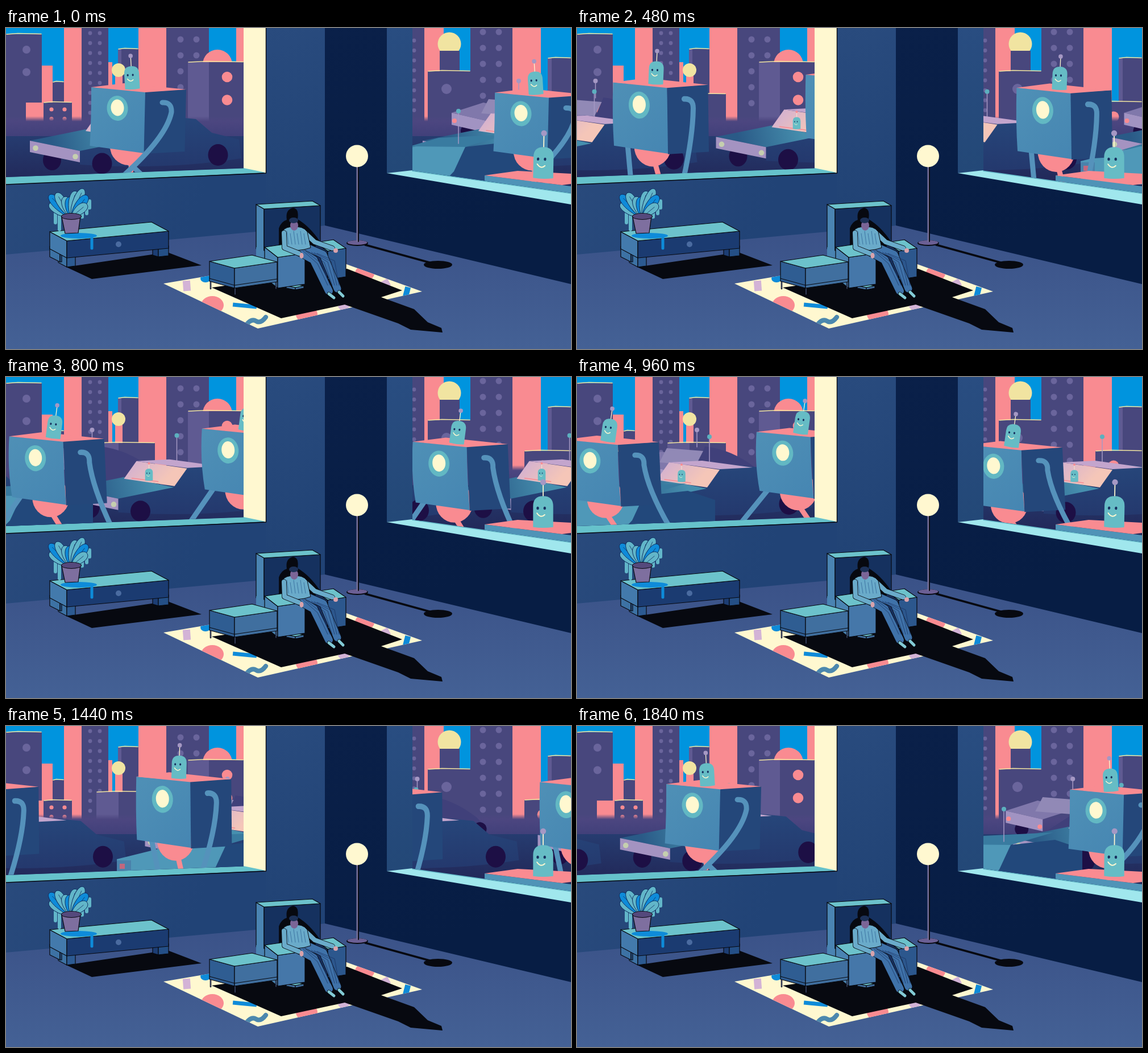
An HTML page with a canvas for the animation above (1.92 s loop, 994 by 564 pixels).

```html
<!DOCTYPE html>
<html lang="en">
<head>
<meta charset="utf-8">
<title>Evening traffic</title>
<style>
html,body{margin:0;width:100%;height:100%;overflow:hidden;background:#24467a}
canvas{display:block;width:994px;height:564px}
</style>
</head>
<body>
<canvas id="c" width="994" height="564"></canvas>
<script>
const W = 994, H = 564, FRAME = 80, COUNT = 24, STRIDE = 23.5, TAU = 2 * Math.PI;
const PINK = '#f98b91', CREAM = '#fff8d0', TEAL = '#6cc2cb', PURPLE = '#48477d', LILAC = '#6a659c',
  STEEL = '#5592bb', INK = '#070910', PLUM = '#1d0f45', YELLOW = '#f1e4a1', MAUVE = '#a598c4',
  SKIN = '#66bcc5', BLUE = '#0e8bd9', NAVY = '#17305f';
const screen = document.getElementById('c').getContext('2d');
let g = screen;

// drawing helpers
function layer(draw) {
  const c = document.createElement('canvas');
  c.width = W; c.height = H;
  g = c.getContext('2d');
  draw();
  g = screen;
  return c;
}
function trace(p) {
  g.beginPath();
  for (let i = 0; i < p.length; i += 2) g.lineTo(p[i], p[i + 1]);
}
function poly(fill, p, edge) {
  trace(p); g.closePath();
  g.fillStyle = fill; g.fill();
  if (edge) { g.strokeStyle = edge; g.lineWidth = 1.2; g.lineJoin = 'round'; g.stroke(); }
}
// parallelogram from a corner and two edge vectors
function quad(fill, x, y, ux, uy, vx, vy, edge) {
  poly(fill, [x, y, x + ux, y + uy, x + ux + vx, y + uy + vy, x + vx, y + vy], edge);
}
// box seen from above: near top corner, edge to the left, edge to the right, height
function box(x, y, [ux, uy], [vx, vy], h, left, right, top = TEAL) {
  quad(left, x, y, ux, uy, 0, h, INK);
  quad(right, x, y, vx, vy, 0, h, INK);
  quad(top, x, y, ux, uy, vx, vy, INK);
}
function line(color, lw, ...p) {
  trace(p);
  g.strokeStyle = color; g.lineWidth = lw; g.lineCap = g.lineJoin = 'round';
  g.stroke();
}
function limb(color, lw, ...p) {
  line(INK, lw + 1.6, ...p);
  line(color, lw, ...p);
}
function oval(fill, x, y, rx, ry = rx, rot = 0) {
  g.beginPath(); g.ellipse(x, y, rx, ry, rot, 0, TAU);
  g.fillStyle = fill; g.fill();
}
function path(d, fill, edge, lw = 1) {
  const p = new Path2D(d);
  if (fill) { g.fillStyle = fill; g.fill(p); }
  if (edge) { g.strokeStyle = edge; g.lineWidth = lw; g.lineCap = 'round'; g.stroke(p); }
}
function rect(fill, x, y, w, h) { g.fillStyle = fill; g.fillRect(x, y, w, h); }
function fade(x0, y0, x1, y1, a, b) {
  const f = g.createLinearGradient(x0, y0, x1, y1);
  f.addColorStop(0, a); f.addColorStop(1, b);
  return f;
}
function at(x, y, draw) { g.save(); g.translate(x, y); draw(); g.restore(); }

// city
function tower(x, w, top, color = PURPLE, lightSide = 0) {
  rect(color, x, top, w, 180 - top);
  if (lightSide) rect('#5f5a92', x, top, lightSide, 180 - top);
  if (color === PURPLE && top > 0) line(YELLOW, 1.5, x + 1, top, x + w / 3, top - 1.5, x + w - 1, top - .5);
}
function windows(x, cols, gap, y, step, rows, r, color = LILAC) {
  for (let i = 0; i < cols; i++)
    for (let j = 0; j < rows; j++) oval(color, x + i * gap, y + j * step, r);
}
function city() {
  rect('#0094de', 0, 0, W, H);
  tower(63, 19, 66, PINK);
  tower(82, 20, 95);
  tower(102, 31, 0, PINK);
  tower(0, 63, 11);
  windows(36, 1, 0, 38, 39.5, 2, 7);
  tower(133, 47, 0);
  windows(148, 2, 17, 9, 17.5, 9, 3.4);
  tower(180, 7, 60, PINK);
  tower(197, 36, 37, PURPLE, 6);
  tower(192, 13, 80, PINK);
  oval(YELLOW, 198, 74, 12);
  tower(233, 49, 0, PINK);
  tower(282, 75, 0);
  windows(307, 2, 28, 20, 28, 5, 5.5);
  tower(405, 13, 0, PINK);
  oval(PINK, 372, 64, 26);
  tower(320, 98, 60, PURPLE, 37);
  windows(389, 1, 0, 86, 40.5, 2, 9.3, PINK);
  tower(159, 103, 116, PURPLE, 39);
  tower(66, 50, 131);
  tower(35, 31, 131, PINK);
  windows(80, 2, 23, 143, 16.5, 2, 3.6, PINK);

  tower(715, 22, 0);
  windows(718, 1, 0, 22, 17.5, 8, 3.4);
  tower(736, 34, 0, PINK);
  oval(YELLOW, 780, 28, 20.5);
  rect(PURPLE, 763, 40, 35, 40);
  tower(742, 75, 76);
  oval(LILAC, 775, 107, 9);
  tower(817, 74, 0);
  windows(839, 2, 28, 7, 28, 6, 5.5);
  tower(891, 50, 0, PINK);
  tower(953, 41, 53, PURPLE, 7);
  tower(912, 82, 130);
  oval(PINK, 944, 156, 9.5);

  rect(fade(0, 155, 0, 164, 'rgba(76,70,128,0)', '#4c4680'), 0, 155, W, 9);
  rect(fade(0, 164, 0, 190, '#4c4680', '#41407a'), 0, 164, W, 26);
  rect(fade(0, 190, 0, 262, '#263c70', '#222a5b'), 0, 190, W, 110);
}

// furniture
function leaf(angle, size, color) {
  g.save();
  g.translate(114, 333);
  g.rotate(angle);
  path(`M0 0 C-12 ${-size * .4} -11 ${-size} 0 ${-size} C11 ${-size} 10 ${-size * .4} 0 0Z`, color, '#0c2a5c', .9);
  line('#0c2a5c', .7, 0, -6, 0, -size + 8);
  g.restore();
}
function plant() {
  oval(BLUE, 128, 365, 32, 5);
  line(BLUE, 5, 151, 366, 151, 387);
  for (const [x, y] of [[87, 342], [94, 354], [134, 332], [142, 326], [147, 316]]) line('#62b6c9', 6, x, 304, x, y);
  for (let i = 0; i < 9; i++)
    leaf(-1 + i * .235, 45 + 10 * Math.sin(i * 1.3), i % 3 === 1 ? BLUE : '#62b6c9');
  poly('#7e6f9f', [98, 332, 131, 330, 127, 360, 104, 361], INK);
  oval(INK, 115, 331, 18, 6);
  oval('#55497c', 115, 331, 17, 5);
}
function bench() {
  poly(INK, [106, 420, 151, 441, 344, 417, 284, 394]);
  box(107, 400, [-15, -8], [15, -2], 20, '#3d72a4', '#2c5a91');
  box(95, 393, [-18, -9], [3, 0], 18, '#3d72a4', '#2c5a91');
  box(268, 385, [-10, -3], [18, -2], 17, '#1c3d73', '#244f86');
  box(107, 374, [-30, -16], [179, -17], 30, '#437aac', '#1b3b71');
  oval('#4a6ba0', 198, 380, 5);
  plant();
}
function bar(color, x, y, w, h, rot) {
  at(x, y, () => { g.rotate(rot); rect(color, -w / 2, -h / 2, w, h); });
}
function rug() {
  const edge = [277, 449, 560, 401, 732, 463, 443, 528];
  poly(CREAM, edge);
  g.save(); trace(edge); g.clip();
  for (const [x, y] of [[318, 453], [595, 489], [666, 450]]) bar('#d3b3d6', x, y, 13, 18, (x - 340) / 300);
  for (const [x, y, r] of [[363, 487, 20], [529, 503, 19], [631, 431, 17]]) oval(PINK, x, y, r, r * .8);
  oval(BLUE, 351, 440, 9, 7);
  bar(BLUE, 420, 488, 42, 7, .1);
  bar(BLUE, 705, 464, 10, 18, .25);
  path('M423 521 Q432 510 440 515 T457 508', null, '#4c88ae', 8);
  g.restore();
  poly(INK, [362, 456, 484, 510, 596, 486, 690, 519, 712, 530, 768, 535, 766, 527, 742, 517, 718, 494, 660, 473, 697, 461, 600, 423]);
}
function chair() {
  box(454, 318, [-14, -8], [99, -6], 78, '#4a84b2', '#15315f');
  quad('#4a84b2', 440, 385, 38, 18, 0, 45);
  path('M480 385 L480 352 Q484 340 494 337 Q491 319 505 316 Q516 317 513 336 Q534 348 553 376 V388Z', INK);
  quad(INK, 526, 397, 60, -12, 0, 50);
  box(566, 392, [-22, -15], [32, -5], 50, NAVY, '#2c578d');
  box(509, 456, [-16, -3], [15, -3], 4, '#416f9f', '#416f9f');
  box(478, 403, [-23, -18], [48, -7], 54, '#4a84b2', '#4577a9');
}
function man() {
  const shirt = '#6aabca', jeans = '#3f72a9';
  limb(jeans, 13, 530, 386, 558, 398, 583, 458);
  limb(jeans, 14, 508, 389, 541, 407, 568, 462);
  limb('#83cbd5', 5, 586, 464, 593, 471);
  limb('#83cbd5', 5, 568, 467, 577, 474);
  limb(shirt, 8, 526, 360, 543, 376, 574, 387);
  path('M487 356 Q494 348 505 350 Q522 347 530 358 L536 386 Q514 394 495 388Z', shirt, INK);
  limb(shirt, 8, 489, 360, 490, 386, 515, 396);
  for (let i = 0; i < 6; i++) {
    line('#2b5f92', .7, 494 + i * 6, 357 + i % 2 * 4, 497 + i * 6, 380);
    line(NAVY, .7, 522 + i * 5, 391 + i, 548 + i * 6, 414 - i, 566 + i * 4, 452);
  }
  oval('#d9a3ac', 520, 400, 3.5, 5);
  oval('#d9a3ac', 580, 391, 4);
  oval('#7b6597', 507, 347, 7, 9);
  oval('#1d3157', 506, 338, 8, 5);
}
function ottoman() {
  for (const [x, y] of [[360, 446], [403, 456], [475, 446]]) limb('#5b6d99', 1, x, y, x, y + 12);
  box(402, 422, [-44, -12], [75, -11], 35, '#2f5d92', '#406f9f');
  line(INK, 1, 358, 440, 402, 452, 477, 441);
}
function lamp() {
  line(INK, 3.5, 632, 381, 745, 412);
  oval(INK, 760, 416, 25, 7);
  oval(INK, 618, 378, 19, 5);
  oval('#6b5f94', 618, 377, 17.5, 4);
  line(INK, 2, 620, 243, 620, 375);
  line('#756f99', 2.6, 617.8, 243, 617.8, 375);
  oval(CREAM, 617.5, 225, 19.5);
}
function room() {
  rect(fade(0, 345, 0, 564, '#3a5187', '#446195'), 0, 0, W, H);
  poly(fade(0, 260, 300, 400, '#294a7c', '#214376'), [0, 0, 561, 0, 561, 347, 0, 398]);
  poly(fade(457, 0, 561, 330, '#294b7e', '#204274'), [457, 0, 561, 0, 561, 347, 457, 356]);
  poly(fade(561, 0, 700, 400, '#0a2049', '#071d44'), [561, 0, W, 0, W, 450, 561, 347]);
  poly(CREAM, [418, 0, 457, 0, 457, 255, 418, 247]);
  poly('#66c2cb', [0, 262, 418, 246, 457, 254, 0, 275]);
  line(INK, 1.4, 457.5, 0, 457.5, 255, 0, 275);
  poly(fade(0, 0, 0, 255, '#294d81', '#234877'), [670, 0, 715, 0, 715, 251, 670, 255]);
  poly('#a0e7ed', [670, 255, 715, 250, W, 290, W, 310]);
  line('#66bccb', 2, 715, 251, W, 290.5);
  for (const draw of [bench, rug, chair, man, ottoman, lamp]) draw();
}

// traffic
function antenna(base, top, color) {
  line(MAUVE, 1.5, 0, base, 0, top);
  oval(color, 0, top, 4);
}
// domed head with face, standing on the current point
function critter(s, tilt, ball = MAUVE) {
  g.save();
  g.scale(s, s);
  g.rotate(tilt);
  line(CREAM, 1.3, 0, -38, 0, -56);
  oval(ball, 0, -56, 3.8);
  path('M-13 2 V-25 Q-13 -38 0 -38 Q13 -38 13 -25 V2 Q0 4 -13 2Z', SKIN);
  for (const x of [-7, 2]) oval(NAVY, x, -22.5, 1.6, 2);
  path('M-8 -16 Q-3 -9 2 -14', null, CREAM, 1.5);
  g.restore();
}
// car coming toward the left; origin is its right headlight
function car(x) {
  at(x, 226 - (x - 122) * .033, () => {
    at(111, -121, () => antenna(50, 0, '#5cb0bf'));
    oval(PLUM, -41, 6, 16, 18);
    path('M8 -10 L105 -33 126 -66 150 -72 212 -66 240 -42 288 -30 292 3 Q160 24 8 14Z', fade(0, -70, 0, 20, '#26467a', '#24386d'));
    quad(fade(-40, -20, 70, -45, '#2a5a87', '#468fae'), -80, -28, 88, 18, 98, -20);
    quad(fade(40, -72, 80, -32, '#d7b3cd', '#f5c6b8'), 18, -45, 89, 13, 22, -31);
    quad('#c3a5cd', 40, -76, 89, 12, 58, -3);
    line(PINK, 1.6, 32, -46, 78, -40);
    at(62, -43, () => critter(.52, 0, PINK));
    oval(PLUM, 47, 12, 17.5, 18.5);
    oval(PLUM, 251, -3, 17.5, 19);
    quad('#a493c1', -80, -28, 88, 18, 0, 20);
    for (const s of [0, 1]) oval('#c5cfaf', -70 * s, -15 * s, 4.8);
  });
}
// distant car heading right; origin is its antenna ball
function farCar(x, y) {
  at(x, y, () => {
    antenna(30, 0, MAUVE);
    path('M14 29 Q62 34 105 68 L125 90 -50 94 0 62Z', '#40407a');
    for (const wx of [-90, 110]) oval(PLUM, wx, 88, 12);
    quad('#8078ab', -118, 56, 65, 15, 56, -18);
    quad('#9189b6', -66, 57, 64, 5, 13, -25);
    quad('#a193c2', -118, 56, 65, 15, 0, 21);
    for (const s of [0, 1]) oval(PINK, -113 + 55 * s, 70 + 14 * s, 4);
  });
}
// near car heading right; origin is the foot of its antenna
function nearCar(x) {
  at(x, 203, () => {
    path('M12 6 L90 -3 138 13 V70 H-40Z', '#22487b');
    quad('#397ba0', -110, 12, 122, -6, 75, -22);
    poly('#4f98b8', [-180, 31, -75, 5, 12, 6, -8, 49, -30, 72, -180, 72]);
    rect('#4a82ab', -180, 33, 25, 40);
    rect('#c1687f', -175, 39, 9, 9);
    antenna(0, -57, '#5cb0bf');
  });
}
function robot(x, swing, hop) {
  const lean = 1.5 - 4 * swing, foot = 122 - 66 * swing;
  at(x, 104 + (150 - x) * .04 - 12 * hop, () => {
    g.save();
    g.scale(1, 1 + .08 * hop);
    line(STEEL, 9, 25, 95, 33 + 58 * swing, 156);
    line(PINK, 9, 72, 125, 82 - 14 * swing, 160);
    oval(PINK, 68 + lean, 104, 32.5, 33);
    path(`M0 0 Q${-1 - lean / 2} 55 ${lean} 103 L${95 + lean} 116 Q${98 - lean / 2} 60 95 8Z`, fade(0, 0, 95, 110, '#4f90b6', '#4686b2'));
    quad('#24477a', 95, 8, 72, -4, lean, 109);
    poly(PINK, [0, 0, 58, -7, 167, 4, 95, 9]);
    oval('#62b8c3', 46, 37, 18.5, 22, -.08);
    oval(CREAM, 46, 36, 11.5, 14.5, -.08);
    path(`M125 27 Q142 26 141 44 Q${141 + .12 * (foot - 130)} 88 ${foot} 156`, null, STEEL, 9);
    g.restore();
    at(75 - 2.5 * swing, 1, () => critter(1, .04 - .1 * swing));
  });
}
function neighbour(k) {
  quad('#4f93b7', 842, 259, 152, 19, 0, 14);
  poly(PINK, [842, 259, 900, 251, W, 256, W, 274, 978, 276]);
  const sway = .02 * Math.sin(Math.PI * (k - 11) / 6);
  at(945, 261, () => critter(1.36, .01 + sway));
}

const cityLayer = layer(city), roomLayer = layer(room);

function pane(shape, draw) {
  g.save();
  trace(shape); g.clip();
  g.drawImage(cityLayer, 0, 0);
  draw();
  g.restore();
}
function traffic(k, farX, nearX, carDx, botDx, botDy) {
  const angle = TAU * k / STRIDE, swing = Math.cos(angle), hop = Math.abs(Math.sin(angle));
  farCar(farX, 93);
  at(carDx, 0, () => {
    for (let n = 0; n < 4; n++) car(122 - 33.75 * k + n * 405);
  });
  nearCar(nearX);
  at(botDx, botDy, () => {
    for (let n = -1; n < 2; n++) robot(150 - 14.43 * k + n * 339, swing, hop);
  });
}
function frame(now) {
  const k = Math.floor(now / FRAME) % COUNT;
  g.drawImage(roomLayer, 0, 0);
  pane([0, 0, 418, 0, 418, 246.5, 0, 262], () =>
    traffic(k, -146 + 29.75 * k, -435 + 45 * k, 0, 0, 0));
  pane([715, 0, W, 0, W, 290, 715, 250.5], () => {
    traffic(k, 600 + (302 + 29.75 * k) % 714, 300 + (496 + 45 * k) % 1080, 691, 710, 9.5);
    neighbour(k);
  });
}
const start = performance.now();
function tick() {
  frame(performance.now() - start);
  requestAnimationFrame(tick);
}
tick();
</script>
</body>
</html>
```
